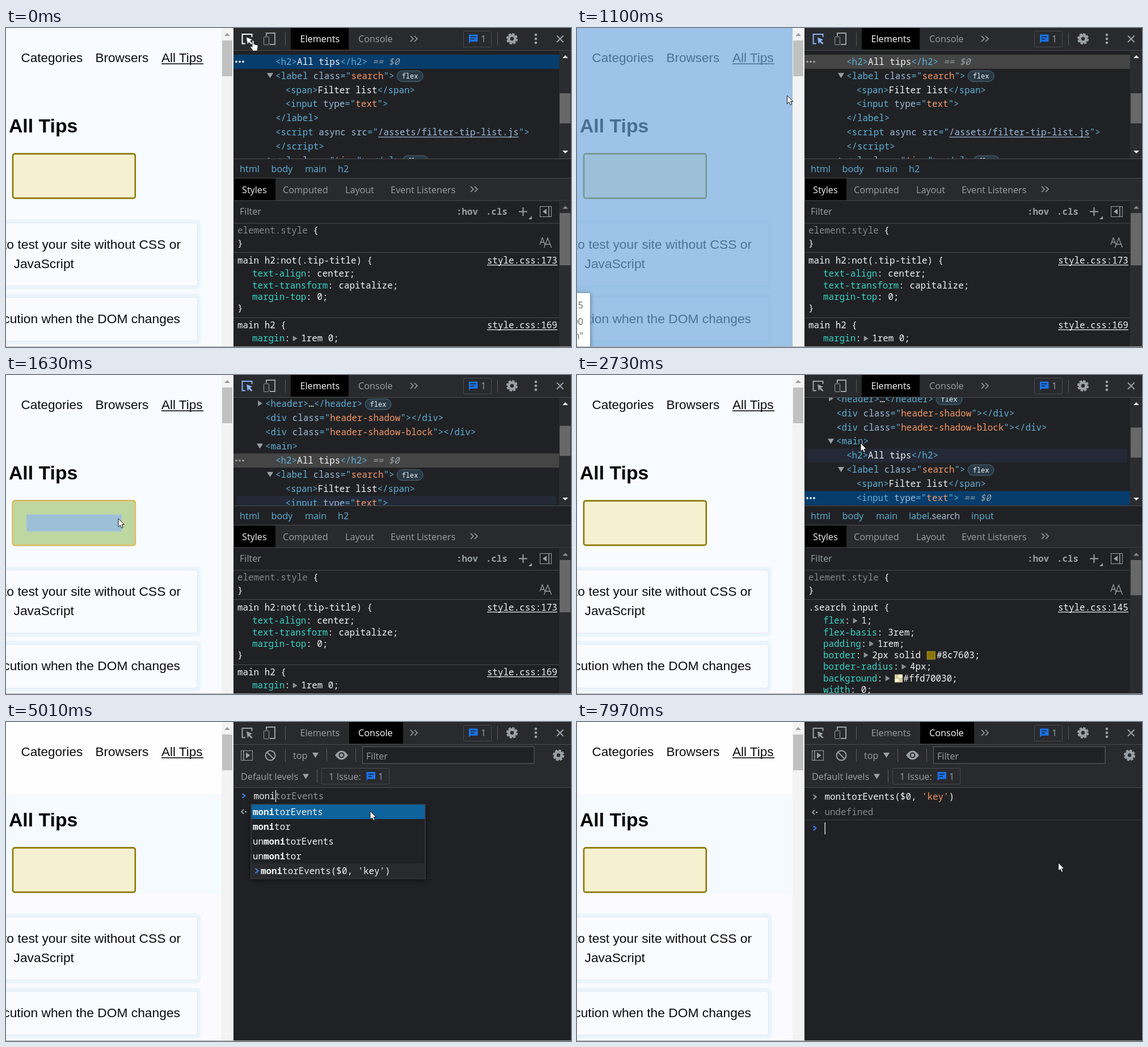
These frames come from a looping animation (996 px wide and 562 px high, 8 s). An HTML page:

```html
<!DOCTYPE html>
<html lang="en">
<head>
<meta charset="utf-8">
<title>Monitor key events from the console</title>
<style>
html, body { margin: 0; width: 100%; height: 100%; overflow: hidden; background: #202124; }
svg { display: block; width: 100vw; height: 100vh; }
text { white-space: pre; }
.m { font: 500 15.88px 'Noto Sans Mono', monospace; }
.u { font: 16.2px 'Open Sans', sans-serif; }
.p { font: 22.5px 'Liberation Sans', sans-serif; }
.c { font: 22.8px 'Liberation Sans', sans-serif; }
.h { font: bold 33.75px 'Liberation Sans', sans-serif; }
.b { font: 500 12px 'Noto Sans Mono', monospace; }
</style>
</head>
<body>
<svg id="stage" viewBox="0 0 996 562" preserveAspectRatio="none"></svg>
<script>
const LOOP = 8000, CH = 9.53, ROW = 24.93;
const GREY = '#9aa0a6', LINE = '#494c50', WHITE = '#f1f3f4', BLUE = '#5db0d7', BLACK = '#0b0b0d';
const INK = { t: BLUE, a: '#9bbbdc', v: '#f29766', w: WHITE, p: '#35d4c7', g: GREY, d: '#85888c' };
const COMMAND = "monitorEvents($0, 'key')";

const esc = s => s.replace(/&/g, '&amp;').replace(/</g, '&lt;');
const text = (x, y, s, fill = GREY, cls = 'u', more = '') =>
  `<text class="${cls}" x="${x}" y="${y}" fill="${fill}" ${more}>${esc(s)}</text>`;
const rect = (x, y, w, h, fill, more = '') =>
  `<rect x="${x}" y="${y}" width="${w}" height="${h}" fill="${fill}" ${more}/>`;
const path = (d, fill, more = '') => `<path d="${d}" fill="${fill}" ${more}/>`;
const line = (d, color = GREY, w = 2) => path(d, 'none', `stroke="${color}" stroke-width="${w}"`);
const frame = (x, y, w, h, color = LINE, r = 2) =>
  rect(x + .5, y + .5, w, h, 'none', `stroke="${color}" rx="${r}"`);
const group = (id, body) => `<g id="${id}">${body}</g>`;
const right = (x, y) => path(`M${x} ${y - 5}l8 5 -8 5Z`, '#8d9196');
const down = (x, y, w = 11) => path(`M${x} ${y - 4}h${w}l${-w / 2} 9Z`, GREY);

// Each piece of "x...|y..." starts with the key of its colour.
const code = (x, mid, s) => `<text class="m" x="${x}" y="${mid + 5.3}">` +
  s.split('|').map(p => `<tspan fill="${INK[p[0]]}">${esc(p.slice(1))}</tspan>`).join('') + '</text>';

const flex = (x, mid) =>
  rect(x + .5, mid - 9, 46, 19, '#293a46', 'rx="9.5" stroke="#4d6b7b"') +
  text(x + 9, mid + 5, 'flex', WHITE, 'b');

const gear = (x, y) =>
  `<g fill="none" stroke="${GREY}"><circle cx="${x}" cy="${y}" r="5.6" stroke-width="4.8"/>
   <circle cx="${x}" cy="${y}" r="8.6" stroke-width="3" stroke-dasharray="4.4 2.35"/></g>`;
const bubble = (x, y) => path(`M${x} ${y}h15.5v12.5h-12.5l-3 3Z`, '#1a73e8') +
  line(`M${x + 3} ${y + 4}h9.5M${x + 3} ${y + 8}h6.5`, '#202124', 1.5);
const more = (x, y) => line(`M${x - 6} ${y - 5}l5 5 -5 5m7 -10l5 5 -5 5`, GREY, 1.6);
const prompt = (y, color) => line(`M416.5 ${y - 4}l5 4 -5 4`, color, 2);
const result = y => line(`M419 ${y - 4}l-4 4 4 4`, GREY, 1.8) + rect(421, y - 1, 3, 2.5, GREY);
const caret = id => rect(436.5, 0, 1.3, 21, WHITE, `id="${id}"`);

function card(y, h) {
  return rect(-20, y - 5.5, 363.5, h + 11, '#ebf4fb', 'rx="8"') +
    rect(-20, y + .5, 357.5, h - 1, '#fafbff', 'rx="5" stroke="#dde9f4"');
}

function page() {
  const end = 'text-anchor="end"';
  return rect(0, 0, 401, 562, '#f8fbff') +
    group('bands', rect(0, 0, 401, 127, '#fefefe') + rect(0, 127, 401, 176, '#f5faff') +
      rect(0, 303, 401, 259, '#fafaff')) +
    group('header', rect(0, 0, 380, 105, '#fafafb')) +
    text(26.5, 60, 'Categories', BLACK, 'p') + text(157.5, 60, 'Browsers', BLACK, 'p') +
    text(274, 60, 'All Tips', BLACK, 'p') + rect(274, 62.3, 74, 1.6, BLACK) +
    text(5, 184, 'All Tips', '#000', 'h') +
    rect(12, 221.6, 215.8, 78.3, '#f5f1d0', 'rx="3.5" stroke="#8c7603" stroke-width="2.6"') +
    card(343, 112) + card(474, 78) +
    text(308, 389, 'to test your site without CSS or', BLACK, 'c', end) +
    text(13.5, 423, 'JavaScript', BLACK, 'c') +
    text(307, 520, 'execution when the DOM changes', BLACK, 'c', end);
}

function overlays() {
  const blue = 'rgba(111,168,220,.66)', green = 'rgba(147,196,125,.55)';
  return group('overBody', rect(0, 0, 380, 562, blue) +
      rect(-20, 467, 43, 110, '#fff', 'rx="3" style="filter:drop-shadow(0 1px 4px #0007)"') +
      ['5', '00', 'n"'].map((s, i) => text(11, [494, 523, 548][i], s, '#5f6368', 'u', 'text-anchor="end"')).join('')) +
    group('overMain', path('M0 105H380V562H338V148H0Z', '#bad9b9') + rect(0, 148, 338, 414, blue)) +
    group('overInput', path('M11 220.5h218v80.5h-218ZM13.8 223.3v74.9h212.4v-74.9Z', 'rgba(255,229,153,.66)') +
      path('M13.8 223.3h212.4v74.9h-212.4ZM36 245.7v30h168v-30Z', green) + rect(36, 245.7, 168, 30, blue));
}

const pageBar = () => rect(380, 0, 21, 562, '#f3f3f4') + rect(381, 22, 18, 63, '#c1c1c1') +
  path('M385 14h10l-5 -5Z', '#9a9a9a');

function toolbar() {
  return rect(401, 0, 595, 39, '#292a2d') + rect(401, 39, 595, 1, LINE) +
    rect(502, 0, 102, 38, '#000', 'id="tab"') +
    group('pick', path('M422 27.5h-5.5v-16.5h17v5', 'none', 'stroke-width="2"') +
      path('M424 16.5l10 4 -4 2 4.5 4.5 -2 2 -4.5 -4.5 -2 4Z', 'currentColor', 'stroke="none"')) +
    line('M459 14v-5h15v20h-9', GREY, 2) + frame(454, 15, 9, 14, GREY, 1) +
    rect(492, 8, 1, 23, '#5a5d61') + rect(866, 8, 1, 23, '#5a5d61') +
    text(518.5, 25, 'Elements', GREY, 'u', 'id="tabElements"') +
    text(621, 25, 'Console', GREY, 'u', 'id="tabConsole"') + more(719, 19) +
    frame(806, 5, 49, 28) + bubble(816, 11.5) + text(837, 25, '1') + gear(892, 19) +
    [12, 19, 26].map(y => `<circle cx="934" cy="${y}" r="2.3" fill="${GREY}"/>`).join('') +
    line('M971 13.5l11.5 11.5m0 -11.5l-11.5 11.5', GREY, 2);
}

// Tree rows: x, markup, arrow (1 open, 2 closed), badge.
const TREE = [
  [457, 't<header>|w…|t</header>', 2, 1],
  [457, 't<div|a class|t="|vheader-shadow|t"></div>'],
  [457, 't<div|a class|t="|vheader-shadow-block|t"></div>'],
  [457, 't<main>', 1],
  [475, 't<h2>|wAll tips|t</h2>'],
  [475, 't<label|a class|t="|vsearch|t">', 1, 1],
  [492.5, 't<span>|wFilter list|t</span>'],
  [492.5, 't<input|a type|t="|vtext|t">'],
  [475, 't</label>'],
  [475, 't<script|a async src|t="|a/assets/filter-tip-list.js|t">'],
  [475, 't</scr' + 'ipt>'],
  [475, 't<ul|a class|t="|vtips|t">|w…|t</ul>', 2, 1]
];

function tree() {
  const rows = TREE.map(([x, s, arrow, badge], i) => {
    const y = i * ROW, chars = s.split('|').reduce((n, p) => n + p.length - 1, 0);
    return code(x, y, s) +
      (arrow === 1 ? down(x - 15, y - 1) : arrow ? right(x - 13, y - 1) : '') +
      (badge ? flex(x + chars * CH + 4, y) : '');
  }).join('');
  const src = 475 + 19 * CH, mark = (id, x, i) => group(id,
    text(x, i * ROW + 5.3, '== $0', GREY, 'm', 'style="font-style:italic"'));
  return '<g clip-path="url(#treeClip)">' + group('tree',
      rect(401, -12.5, 575, 25, '#063d6c', 'id="selected"') +
      rect(406, -12.5, 564, 25, '#232936', 'id="hover" rx="5"') + rows +
      rect(src, 9 * ROW + 7.5, 26 * CH, 1.2, INK.a) +
      mark('markH2', 646, 4) + mark('markInput', 682, 7) +
      group('dots', [406, 412, 418].map(x => `<circle cx="${x}" cy="0" r="1.8"/>`).join(''))) + '</g>' +
    rect(975, 40, 21, 190, '#2b2c2f') + rect(976, 115, 19, 53, '#686868', 'id="thumb"') +
    path('M981 53h10l-5 -5ZM981 216h10l-5 5Z', WHITE);
}

const prop = (y, name, value) => code(434, y, 'p' + name + '|w: ' + value);
const longProp = (y, name, value, gap = 0) => {
  const x = 434 + (name.length + 1) * CH;
  return code(434, y, 'p' + name + '|w:') + right(x + 5, y) + code(x + 19.5 + gap, y, 'w' + value);
};
const rule = (y, selector, num) => code(408, y, 'w' + selector + ' {') +
  code(848, y, 'wstyle.css:' + num) + rect(848, y + 7, 124, 1.2, WHITE);

function styles() {
  const tabs = [[416, 'Styles', WHITE], [488, 'Computed'], [598, 'Layout'], [678, 'Event Listeners']];
  const bold = 'style="font-weight:700"';
  const check = [[0, 0], [7, 0], [0, 7], [7, 7]].map(([a, b], i) =>
    rect(560 + a, 527.5 + b, 7, 7, i % 3 ? '#fff7cf' : '#d9cf9c')).join('');
  return rect(401, 230, 595, 1, LINE) + rect(401, 264, 595, 1, LINE) +
    [[412, 'html'], [467.5, 'body'], [527, 'main']].map(([x, s]) => text(x, 254, s, BLUE)).join('') +
    group('crumbH2', text(585, 254, 'h2', BLUE)) +
    group('crumbInput', `<text class="u" x="585" y="254" fill="${BLUE}">label<tspan fill="#a9c6dc">.search</tspan></text>` +
      text(695, 254, 'input', BLUE)) +
    rect(401, 265, 595, 39, '#292a2d') + rect(402, 265, 73, 39, '#000') +
    tabs.map(([x, s, c]) => text(x, 291, s, c)).join('') + more(825, 284) +
    rect(401, 303.5, 595, 1, LINE) + text(412, 329, 'Filter') +
    text(794, 329, ':hov', GREY, 'm', bold) + text(846, 329, '.cls', GREY, 'm', bold) +
    line('M904 323.5h15m-7.5 -7.5v15') + path('M927 331v6h-6Z', GREY) +
    frame(941, 314, 20, 18, GREY, 0) + rect(956, 315, 1.5, 18, GREY) + path('M953 318.5v10l-7 -5Z', GREY) +
    rect(401, 343.5, 574, 1, LINE) +
    code(408, 357, 'delement.style|w {') + code(408, 380, 'w}') +
    line('M941 381.5l4.5 -12 4.5 12m-7.5 -4h6M948.5 387l6.5 -17 6.5 17m-11 -6h9', GREY, 1.3) +
    rect(401, 395, 574, 1, LINE) +
    group('rulesH2', rule(410, 'main h2:not(.tip-title)', 173) + prop(433, 'text-align', 'center;') +
      prop(453.5, 'text-transform', 'capitalize;') + prop(473.5, 'margin-top', '0;') + code(408, 494, 'w}') +
      rect(401, 510, 574, 1, LINE) + rule(524, 'main h2', 169) + longProp(547, 'margin', '1rem 0;') +
      code(408, 568, 'w}')) +
    group('rulesInput', rule(410, '.search input', 145) + longProp(433, 'flex', '1;') +
      prop(453.5, 'flex-basis', '3rem;') + longProp(473.5, 'padding', '1rem;') +
      longProp(493.5, 'border', '2px solid') + rect(617, 487, 14.5, 14, '#8c7603', 'stroke="#a99a4a" stroke-width=".8"') +
      code(634, 493.5, 'w#8c7603;') + longProp(514, 'border-radius', '4px;') +
      longProp(534.5, 'background', '#ffd70030;', 17) + check + prop(554.5, 'width', '0;')) +
    rect(975, 304, 21, 258, '#2b2c2f') + rect(976, 326, 19, 92, '#686868', 'id="styleThumb"') +
    path('M981 318.5h10l-5 -5Z', '#8a8a8a');
}

function consoleView() {
  const bar = (x, y) => rect(x, y, 1, 23, '#5a5d61');
  return rect(401, 40, 595, 75, '#292a2d') + rect(401, 115, 595, 1, LINE) +
    frame(414, 50, 20, 17, GREY, 0) + rect(418, 51, 1.5, 17, GREY) + path('M423 53.5v10.5l7.5 -5.2Z', GREY) +
    `<circle cx="466" cy="59" r="8.5" fill="none" stroke="${GREY}" stroke-width="2"/>` + line('M460 53l12 12') +
    bar(492, 47) + text(506, 65, 'top') + down(540, 58) + bar(565, 47) +
    path('M580 58.5q11.5 -16 23 0q-11.5 16 -23 0Z', GREY) +
    `<circle cx="591.5" cy="58.5" r="4" fill="${GREY}" stroke="#292a2d" stroke-width="2"/>` + bar(616, 47) +
    rect(628.5, 43.5, 302.5, 29.5, '#202124', 'stroke="#5f6266"') + text(635, 65.5, 'Filter') + gear(974, 58.5) +
    text(414, 102, 'Default levels') + down(523, 95.5) + bar(548, 84) +
    frame(556, 81, 119, 28) + text(569, 102, '1 Issue:') + bubble(635.5, 88) + text(656, 102, '1') +
    group('edit', prompt(130, '#3b82f6') + '<text class="m" id="typed" x="436.5" y="135.5"></text>' + caret('caretEdit')) +
    group('done', prompt(132, GREY) + code(436.5, 132, "wmonitorEvents($0, |v'key'|w)") + result(159) +
      code(436.5, 159, 'dundefined') + rect(401, 172, 595, 1, '#3a3c40') + prompt(187, '#3b82f6') + caret('caretDone')) +
    group('popup', result(158) + rect(432, 145, 307, 131, '#202124', 'stroke="#4b4e52" style="filter:drop-shadow(0 2px 4px #0009)"') +
      rect(432.5, 249, 306, 26.5, '#292a2d') + rect(432.5, 145.5, 306, 25.5, '#0e639c') +
      rect(432.5, 0, 306, 26, '#35383d', 'id="rowHover"') + line('M439.5 258l5 4.2 -5 4.2', '#3b82f6', 2) +
      group('options', ''));
}

const cursors = group('cursor',
  group('arrow', path('M0 0V14.5L3.4 11.4 5.8 16.6 8.3 15.5 6 10.4H10.4Z', '#fff', 'stroke="#111"')) +
  group('hand', path('M-1.6 1.5a1.6 1.6 0 0 1 3.2 0V6.5l5.5 1.3q2 .6 1.6 3l-1.2 7.7h-7.5L-4.8 11.6q-.6 -2.4 1.6 -1.4l1.6 1.4Z', '#fff', 'stroke="#111"')));

document.getElementById('stage').innerHTML =
  '<defs><clipPath id="treeClip"><rect x="401" y="40" width="574" height="190"/></clipPath></defs>' +
  page() + overlays() + pageBar() + rect(401, 0, 595, 562, '#202124') + toolbar() +
  group('elements', tree() + styles()) + group('console', consoleView()) +
  rect(0, 561, 996, 1, '#a8a8a8') + cursors;

const $ = id => document.getElementById(id);
const set = (id, attrs) => { for (const k in attrs) $(id).setAttribute(k, attrs[k]); };
const show = (id, on) => { $(id).style.display = on ? '' : 'none'; };
const pick = (steps, t) => steps.reduce((a, b) => b[0] <= t ? b : a);

const MOVES = [
  [0, 435.5, 22], [970, 405, 80], [1100, 370.5, 119], [1220, 300, 180], [1360, 229.5, 239],
  [1500, 206, 248], [1630, 198, 253], [2580, 223, 233], [2730, 500, 120], [2860, 525, 106],
  [2990, 555, 90], [3090, 590, 72], [3230, 636, 34], [3510, 641, 31], [3660, 574, 80],
  [3790, 595, 105], [3930, 614, 128], [4050, 632, 148], [4170, 642, 157], [5960, 640, 231],
  [6110, 637, 256], [6240, 634, 270], [6530, 633, 266], [6790, 632, 261], [7050, 658, 249],
  [7190, 790, 247], [7310, 848.5, 248]
];
const TYPED = [[0, ''], [4600, 'm'], [4760, 'mo'], [4890, 'mon'], [5010, 'moni'], [6370, COMMAND]];
const HOVERS = [[0, -1], [1500, 7], [2150, -1], [2730, 4], [2860, 3], [2990, 2], [3090, 1], [3230, -1]];
const SCROLL = [[0, -40.3, 115], [1360, 51, 89.5], [2150, 42.4, 92.5]];
const OPTIONS = ['monitorEvents', 'monitor', 'unmonitorEvents', 'unmonitor', COMMAND];

function options(n) {
  return OPTIONS.map((s, i) => {
    const at = s.indexOf('moni');
    return `<text class="m" x="${i === 4 ? 449 : 435}" y="${163.5 + i * 26}" fill="${WHITE}">${s.slice(0, at)}` +
      `<tspan font-weight="700">${s.slice(at, at + n)}</tspan>${s.slice(at + n)}</text>`;
  }).join('');
}

function drawTree(t) {
  const [, y, thumb] = pick(SCROLL, t), hover = pick(HOVERS, t)[1];
  const input = t >= 2150, styled = t >= 2300, idle = t >= 560 && !input, row = (input ? 7 : 4) * ROW;
  set('tree', { transform: `translate(0 ${y})` });
  set('thumb', { y: thumb });
  set('selected', { transform: `translate(0 ${row})`, fill: idle ? '#454545' : '#063d6c' });
  set('dots', { transform: `translate(0 ${row})`, fill: idle ? GREY : '#fff' });
  show('hover', hover >= 0);
  set('hover', { transform: `translate(0 ${hover * ROW})` });
  show('markH2', !input); show('markInput', input);
  show('crumbH2', !input); show('crumbInput', input);
  show('rulesH2', !styled); show('rulesInput', styled);
  set('styleThumb', { height: styled ? 62 : 92 });
}

let lastTyped = null;
function drawConsole(t) {
  const s = pick(TYPED, t)[1], done = t >= 7850, hover = t >= 6110 ? 4 : 3;
  if (s !== lastTyped) {
    const full = s === COMMAND, ghost = s.length > 1 && !full ? 'monitorEvents'.slice(s.length) : '';
    $('typed').innerHTML = `<tspan fill="${WHITE}">${full ? 'monitorEvents($0, ' : s}</tspan>` +
      (full ? `<tspan fill="${INK.v}">'key'</tspan><tspan fill="${WHITE}">)</tspan>` : `<tspan fill="#8f959b">${ghost}</tspan>`);
    $('options').innerHTML = options(Math.min(s.length, 4));
    lastTyped = s;
  }
  show('edit', !done); show('done', done);
  show('popup', t >= 4760 && t < 6530);
  show('rowHover', t >= 5960);
  set('rowHover', { y: 145 + hover * 26 });
  set('caretEdit', { x: 436.7 + s.length * CH, y: 120 });
  set('caretDone', { y: 177 });
  show('caretEdit', !(t >= 5580 && t < 6370) && !(t >= 7190 && t < 7720));
}

function draw(t) {
  const inConsole = t >= 3510, hand = t < 970 || (t >= 3230 && t < 3660);
  const color = t < 560 ? '#fff' : t < 2150 ? '#8ab4f8' : GREY;
  show('elements', !inConsole); show('console', inConsole);
  show('bands', t >= 3090);
  show('header', t >= 1220 && t < 1500);
  show('overBody', t >= 1100 && t < 1220);
  show('overMain', t >= 1220 && t < 1500);
  show('overInput', t >= 1500 && t < 2150);
  set('pick', { color, stroke: color });
  set('tab', { x: inConsole ? 605 : 502, width: inConsole ? 95 : 102 });
  set('tabElements', { fill: inConsole ? GREY : '#fff' });
  set('tabConsole', { fill: t >= 3230 ? '#fff' : GREY });
  inConsole ? drawConsole(t) : drawTree(t);
  const [, x, y] = pick(MOVES, t);
  set('cursor', { transform: `translate(${x} ${y})` });
  show('hand', hand); show('arrow', !hand);
}

const start = performance.now();
(function tick() {
  draw((performance.now() - start) % LOOP);
  requestAnimationFrame(tick);
})();
</script>
</body>
</html>
```
